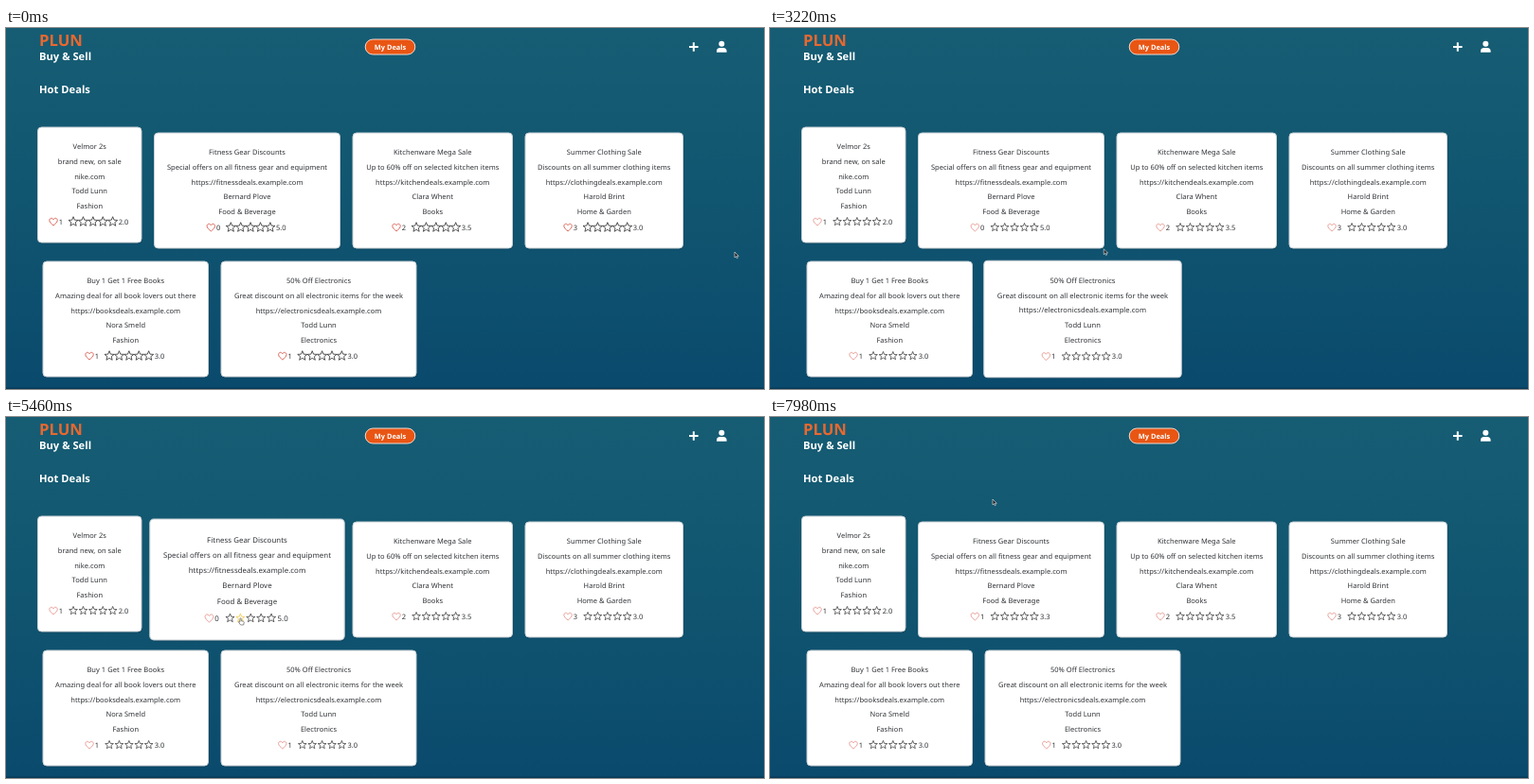
Write an HTML page that moves like this. It is 800x382 px and loops after 8 s.

```html
<!DOCTYPE html>
<html lang="en">
<head>
<meta charset="utf-8">
<title>Deals</title>
<style>
  html, body { margin: 0; width: 100%; height: 100%; overflow: hidden; background: #0d506f; }
  svg { display: block; width: 100%; height: 100%; }
  text { font: 500 7.5px "Noto Sans", "Open Sans", sans-serif; letter-spacing: .03px; fill: #303236; text-rendering: geometricPrecision; }
  .mid { text-anchor: middle; }
  .logo { font-size: 16.7px; font-weight: 700; letter-spacing: 0; fill: #e8682f; }
  .head { font-size: 11.2px; font-weight: 700; letter-spacing: 0; fill: #fff; }
  .button { font-size: 7.4px; font-weight: 700; letter-spacing: 0; fill: #fff; }
  .heart, .star { fill: none; stroke-linejoin: round; }
  .heart { stroke: #d9594c; stroke-width: .9; }
  .star { stroke: #2c2c2e; stroke-width: .8; }
  .lit { stroke: #f3c02f; }
</style>
</head>
<body>
<svg viewBox="0 0 800 382" preserveAspectRatio="none">
  <defs>
    <linearGradient id="sea" x2="0" y2="1">
      <stop stop-color="#165d74"/><stop offset=".45" stop-color="#115670"/><stop offset="1" stop-color="#0a4a6d"/>
    </linearGradient>
  </defs>
  <rect width="800" height="382" fill="url(#sea)"/>
  <rect y="380.5" width="800" height="1.5" fill="#083a58"/>
  <text class="logo" x="35" y="18.6">PLUN</text>
  <text class="head" x="35" y="34">Buy &amp; Sell</text>
  <text class="head" x="35" y="69">Hot Deals</text>
  <g id="scene"></g>
</svg>
<script>
const LOOP = 8000, STEP = 70, CARD_HEIGHT = 122;
const RATED = 5950, LIKED = 7070;   // both reload the page
const scene = document.getElementById('scene');

const card = (x, y, w, likes, stars, ...lines) => ({ x, y, w, likes, stars, lines });
const cards = [
  card(33.5, 105, 109.5, 1, '2.0', 'Velmor 2s', 'brand new, on sale', 'nike.com', 'Todd Lunn', 'Fashion'),
  card(156.5, 111, 196, 0, '5.0', 'Fitness Gear Discounts', 'Special offers on all fitness gear and equipment',
    'https://fitnessdeals.example.com', 'Bernard Plove', 'Food &amp; Beverage'),
  card(366, 111, 168.5, 2, '3.5', 'Kitchenware Mega Sale', 'Up to 60% off on selected kitchen items',
    'https://kitchendeals.example.com', 'Clara Whent', 'Books'),
  card(548, 111, 166.5, 3, '3.0', 'Summer Clothing Sale', 'Discounts on all summer clothing items',
    'https://clothingdeals.example.com', 'Harold Brint', 'Home &amp; Garden'),
  card(39, 247, 174.5, 1, '3.0', 'Buy 1 Get 1 Free Books', 'Amazing deal for all book lovers out there',
    'https://booksdeals.example.com', 'Nora Smeld', 'Fashion'),
  card(227, 247, 206, 1, '3.0', '50% Off Electronics', 'Great discount on all electronic items for the week',
    'https://electronicsdeals.example.com', 'Todd Lunn', 'Electronics')
];
const fitness = cards[1];

// Pointer stops: time, x, y
const stops = [
  [0, 769, 237], [1190, 702, 293], [2660, 446, 271], [3600, 300, 213], [3920, 280, 213],
  [4060, 259, 213], [4250, 247, 213], [5600, 247, 213], [5850, 237, 222], [6150, 237, 222],
  [6600, 216, 211], [7200, 216, 211], [7700, 235, 87], [LOOP, 235, 87]
];
function pointer(time) {
  const t = Math.max(0, time);
  const i = stops.findIndex((s, n) => n && t <= s[0]);
  const [t0, x0, y0] = stops[i - 1], [t1, x1, y1] = stops[i];
  const u = (t - t0) / (t1 - t0), e = u * u * (3 - 2 * u);
  return { x: x0 + (x1 - x0) * e, y: y0 + (y1 - y0) * e };
}

// Share of the last 200 ms the pointer spent over the card
function hover(c, t) {
  const samples = 8;
  let hits = 0;
  for (let k = 0; k < samples; k++) {
    const p = pointer(t - k * 25);
    if (p.x > c.x && p.x < c.x + c.w && p.y > c.y && p.y < c.y + CARD_HEIGHT) hits++;
  }
  return hits / samples;
}

const text = (x, y, s, cls = '') => `<text class="${cls}" x="${x}" y="${y}">${s}</text>`;

const starPoints = Array.from({ length: 10 }, (_, i) => {
  const r = i % 2 ? 2.3 : 5.3, a = i * Math.PI / 5;
  return `${(r * Math.sin(a)).toFixed(2)},${(-r * Math.cos(a)).toFixed(2)}`;
}).join(' ');
const starX = i => -17.2 + 10.4 * i;

function rating(c, mid, y, likes, stars, faint, lit) {
  let out = `<path class="heart" opacity="${faint ? .6 : 1}" transform="translate(${mid - 38.2} ${y})"
    d="M0 4C-2 2.3-4.2.6-4.2-1.4C-4.2-4-1.2-4.6 0-2.3C1.2-4.6 4.2-4 4.2-1.4C4.2.6 2 2.3 0 4Z"/>`;
  out += text(mid - 32.6, y + 2.8, likes);
  for (let i = 0; i < 5; i++) {
    out += `<polygon class="star ${i === lit ? 'lit' : ''}" points="${starPoints}"
      transform="translate(${mid + starX(i)} ${y}) scale(${faint ? .86 : 1})"/>`;
  }
  return out + text(mid + 30.5, y + 2.8, stars);
}

function drawCard(c, { x = c.x, w = c.w, h = CARD_HEIGHT, scale = 1, footer = '' }) {
  const mid = x + w / 2, cy = c.y + h / 2;
  return `<g transform="translate(${mid} ${cy}) scale(${scale}) translate(${-mid} ${-cy})">
    <rect x="${x + .3}" y="${c.y + .8}" width="${w + .6}" height="${h + .6}" rx="4.5" fill="#062f45" opacity=".35"/>
    <rect x="${x}" y="${c.y}" width="${w}" height="${h}" rx="4" fill="#fff" stroke="#c8cfd3" stroke-width="1"/>
    ${c.lines.map((s, i) => text(mid, c.y + 23.4 + 15.55 * i, s, 'mid')).join('')}${footer}</g>`;
}

const button = x => `<rect x="${x - 26.3}" y="12" width="52.6" height="16" rx="8" fill="#e95513" stroke="#f0dcd3"/>` +
  text(x, 22.8, 'My Deals', 'button mid');

const icons = `<path d="M721 20h9.6M725.8 15.2v9.6" stroke="#fff" stroke-width="2"/>
  <circle cx="755.3" cy="16.8" r="3" fill="#fff"/>
  <path d="M750 25.8v-1.3q0-3.6 3.6-3.6h3.4q3.6 0 3.6 3.6v1.3z" fill="#fff"/>`;

function drawPointer({ x, y }, hand) {
  const d = hand
    ? 'M0 0q.8-.6 1.2.3v2.4l2.4.6q.8.3.6 1.2l-.5 2.5h-3.1l-2-2.7q-.2-.8.6-.6l.6.5z'
    : 'M0 0v5.9l1.4-1.2.9 2 1-.4-.9-2h1.9z';
  return `<path transform="translate(${x} ${y})" d="${d}" fill="${hand ? '#fff' : '#222'}"
    stroke="${hand ? '#444' : '#e8eef0'}" stroke-width=".6"/>`;
}

function loadingPage(t, withCards) {
  if (!withCards) return button(415.5);
  const likes = t >= LIKED ? 1 : 0;
  const layout = [[156, 92.5, 1, '2.0'], [262, 196, likes, '3.3'], [472, 168]];
  return button(415.5) + layout.map(([x, w, count, stars], i) => {
    const c = cards[i], mid = x + w / 2, y = c.y + 102.8;
    const footer = stars ? text(mid - 11, y, count) + text(mid - .7, y, stars) : '';
    return drawCard(c, { x, w, h: stars ? CARD_HEIGHT : 110.5, footer });
  }).join('');
}

function fullPage(t, p) {
  const faint = t >= 2000 && t < 3500 || t >= 4500;
  const trail = pointer(t - STEP);
  return button(405.5) + icons + cards.map(c => {
    const scale = 1 + .048 * hover(c, t), mid = c.x + c.w / 2;
    const likes = c === fitness && t >= LIKED ? 1 : c.likes;
    const stars = c === fitness && t >= RATED ? '3.3' : c.stars;
    let lit = -1;
    if (Math.abs(trail.y - c.y - 101.5) < 6)
      lit = [0, 1, 2, 3, 4].findIndex(i => Math.abs(trail.x - mid - scale * starX(i)) < 5.4);
    return drawCard(c, { scale, footer: rating(c, mid, c.y + 100, likes, stars, faint, lit) });
  }).join('');
}

function render(t) {
  const p = pointer(t);
  const reload = [RATED, LIKED].find(start => t >= start && t < start + 2 * STEP);
  const page = reload ? loadingPage(t, t >= reload + STEP) : fullPage(t, p);
  const hand = !reload && Math.abs(p.y - 213) < 7 && p.x > 210 && p.x < 286;
  scene.innerHTML = page + drawPointer(p, hand);
}

let shown = -1;
function tick() {
  const t = Math.floor(performance.now() % LOOP / STEP) * STEP;
  if (t !== shown) render(shown = t);
  requestAnimationFrame(tick);
}
tick();
</script>
</body>
</html>
```
